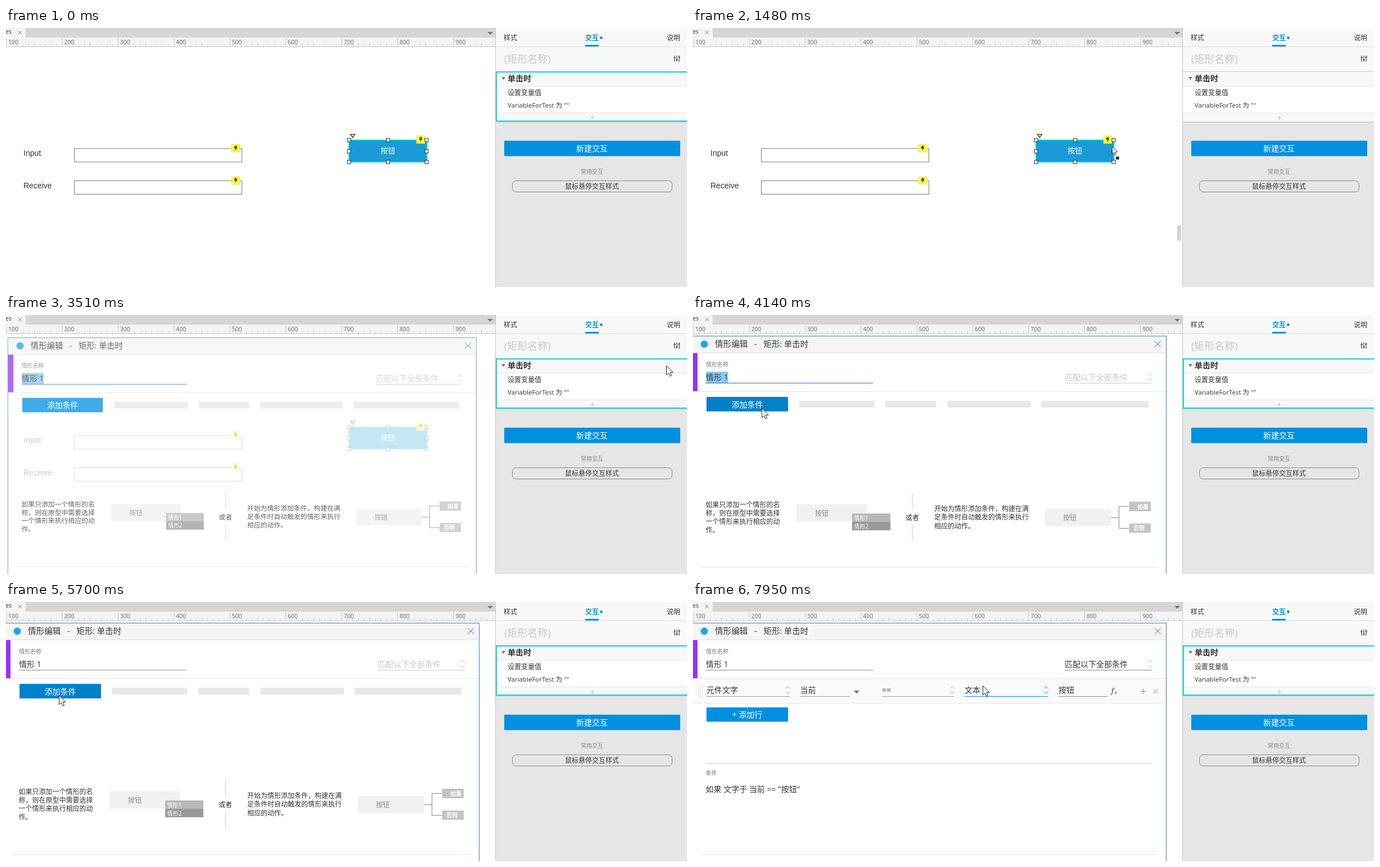
Recreate the animation shown at these times as an HTML page. Size 1211 by 462 pixels, loop 8000 ms.

```html
<!DOCTYPE html>
<html lang="zh">
<head>
<meta charset="utf-8">
<style>
html, body { margin: 0; width: 100%; height: 100%; overflow: hidden; background: #fff; }
svg { display: block; width: 1211px; height: 462px; }
text { font-family: "Open Sans", "Noto Sans CJK SC", "Noto Sans CJK", sans-serif; white-space: pre; }
.arial { font-family: "Liberation Sans", Arial, sans-serif; }
.serif { font-family: "Noto Serif", serif; font-style: italic; }
</style>
</head>
<body>
<svg id="stage" viewBox="0 0 1211 462"></svg>
<script>
const LOOP = 8000, BLUE = '#0090e0', HOVER = '#0081ca', DARK = '#333', CYAN = '#14d5da';

// Drawing helpers
const box = (x, y, w, h, fill, more = '') => `<rect x="${x}" y="${y}" width="${w}" height="${h}" fill="${fill}" ${more}/>`;
const path = (d, stroke, more = '') => `<path d="${d}" fill="none" stroke="${stroke}" ${more}/>`;
const shape = (d, fill, more = '') => `<path d="${d}" fill="${fill}" ${more}/>`;
const text = (x, y, s, size = 14, fill = DARK, more = '') =>
  `<text x="${x}" y="${y}" font-size="${size}" fill="${fill}" ${more}>${s}</text>`;
const mid = (x, y, s, size, fill, more = '') => text(x, y, s, size, fill, 'text-anchor="middle" ' + more);
const group = (id, body, more = '') => `<g id="${id}" ${more}>${body}</g>`;
const cross = (x, y, r, color) => path(`M${x - r} ${y - r}l${2 * r} ${2 * r}m0 ${-2 * r}l${-2 * r} ${2 * r}`, color);
const plus = (x, y, r, color) => path(`M${x - r} ${y}h${2 * r}m${-r} ${-r}v${2 * r}`, color);
const arrows = (x, y, color) => path(`M${x - 4} ${y - 2.5}l4 -4 4 4m0 5l-4 4 -4 -4`, color);
const lines = (x, y, step, rows) => rows.map((s, i) => text(x, y + i * step, s, 12)).join('');
const bolt = (x, y) => box(x, y, 15, 14, '#ffff3c', 'stroke="#d8d86a" stroke-width=".6"') +
  shape(`M${x + 6} ${y + 2.5}h4l-1.5 3h2.5l-5 6 1.2 -4.2h-3z`, '#444');

function ruler() {
  let out = box(0, 0, 870, 17.5, '#d6d6d6') + box(0, 0, 35, 18, '#f4f4f4') + box(0, 17.5, 870, 16, '#f4f4f4') +
    text(-1, 10, 'es', 10.5) + cross(24.5, 8, 3, '#777') + shape('M856 7h10l-5 5z', '#777');
  let ticks = '';
  for (let i = 0; i < 88; i++) {
    const x = (0.6 + i * 9.94).toFixed(1);
    ticks += i % 10 ? `M${x} ${i % 5 ? 29.5 : 27.5}V33` : `M${x} 18V33`;
  }
  out += path(ticks, '#c4c4c4');
  for (let i = 1; i < 10; i++) out += text(4 + (i - 1) * 99.4, 29, i * 100, 10.5, '#666');
  return out + path('M0 33.5H870', '#ccc');
}

function canvas() {
  const field = (y, label) => text(31, y + 12.5, label, 14, DARK, 'class="arial"') +
    box(121.5, y - 0.5, 298, 24, '#fff', 'stroke="#797979"') + bolt(401, y - 8);
  const grips = [[610, 200], [679.5, 200], [748, 200], [610, 220], [748, 220], [610, 239], [679.5, 239], [748, 239]];
  return field(215.5, 'Input') + field(273, 'Receive') +
    box(610, 200, 138.5, 39, '#1a9bd7', `stroke="${CYAN}" stroke-width="2"`) +
    mid(679, 222.5, '按钮', 13, '#fff') + bolt(730, 192) +
    grips.map(([x, y]) => box(x - 3, y - 3, 6, 6, '#fff', 'stroke="#222"')).join('') +
    shape('M612.5 189.5h8l-4 6z', '#ffe94a', 'stroke="#222" stroke-width="1.2"') +
    box(861, 351.5, 7, 28, '#d2d2d2', 'id="thumb" rx="1.5"');
}

function panel() {
  const sliders = [[1189, 53], [1193, 57], [1197, 52]]
    .map(([x, y]) => path(`M${x} 49V60M${x - 1.8} ${y}h3.6`, '#555', 'stroke-width="1.3"')).join('');
  return box(870, 0, 341, 462, '#e6e6e6') + box(870, 0, 341, 78, '#f8f8f8') + path('M870 33.5H1211', '#ddd') +
    text(885, 21.5, '样式', 12) + text(1030, 21.5, '交互', 12, BLUE, 'font-weight="700"') +
    text(1175, 21.5, '说明', 12) + `<circle cx="1058.5" cy="17.5" r="2.4" fill="${BLUE}"/>` +
    box(1030, 30, 24, 3, BLUE) + text(886, 62, '(矩形名称)', 18, '#c6c6c6') + sliders +
    box(871, 167, 340, 1.5, '#ccc') + box(871, 78, 340, 89, '#f8f8f8') + box(871, 104, 340, 47, '#fff') +
    path('M871 77.5H1211', '#ccc') + path('M871 103.5H1211M871 151.5H1211', '#e4e4e4') +
    shape('M881 87.5h7l-3.5 5z', '#777') + text(892, 94.5, '单击时', 14, DARK, 'font-weight="700"') +
    text(892, 120, '设置变量值', 12, DARK, 'font-weight="500"') +
    text(892, 142, 'VariableForTest 为 ""', 11.5) + plus(1042.5, 160, 3.5, '#bbb') +
    group('caseHover', box(871.5, 78.5, 345, 88, 'none', 'stroke="#888"') +
      box(1139.5, 82.5, 63, 15, '#e9e9e9', 'rx="5" stroke="#c4c4c4"') + mid(1171, 94, '启用情形', 10, '#888')) +
    box(872, 78.5, 345, 87.5, 'none', `id="caseSelected" stroke="${CYAN}" stroke-width="2"`) +
    box(886, 201, 313, 27.5, BLUE, 'rx="1.5"') + mid(1042, 220, '新建交互', 14, '#fff') +
    mid(1042, 260, '常用交互', 10, '#888') + box(900.5, 272.5, 284, 20, 'none', 'rx="7" stroke="#888"') +
    mid(1042, 287, '鼠标悬停交互样式', 12) + path('M870.5 0V462', '#c4c4c4');
}

function emptyPage() {
  const bars = [[189, 133.5], [342, 90.5], [452.5, 148], [620, 190.5]];
  return box(24, 146, 145, 26, BLUE, 'id="addButton" rx="1.5"') + mid(96.5, 164.5, '添加条件', 14, '#fff') +
    bars.map(([x, w]) => box(x, 153, w, 12, '#e8e8e8')).join('') +
    lines(22.5, 342.5, 15, ['如果只添加一个情形的名', '称，则在原型中需要选择', '一个情形来执行相应的动', '作。']) +
    box(184, 337.5, 125.5, 31, '#f1f1f1') + mid(229, 357.5, '按钮', 12, '#888') +
    box(283, 354, 68, 15, '#b8b8b8') + box(283, 369, 68, 15, '#9a9a9a') +
    text(286.5, 366, '情形1', 10, '#fff') + text(286.5, 380.5, '情形2', 10, '#fff') +
    path('M390 318V347M390 374V403', '#ccc') + mid(390, 365.5, '或者', 12, DARK) +
    lines(429, 349.5, 15.5, ['开始为情形添加条件，构建在满', '足条件时自动触发的情形来执行', '相应的动作。']) +
    box(625.5, 346, 117.5, 30.5, '#f1f1f1') + mid(670, 366, '按钮', 12, '#888') +
    path('M743 361.5H757.5M775 341.5H757.5V380.5H775', '#888') +
    box(775.5, 333, 38.5, 17, '#c4c4c4') + box(775.5, 372, 38.5, 16.5, '#c4c4c4') +
    mid(800, 345.5, '如果', 10, '#fff', 'font-weight="700"') + mid(793, 384, '否则', 10, '#fff', 'font-weight="700"');
}

const selects = [[24, 172, '元件文字'], [190.5, 279, '当前'], [336, 464.5, '=='], [483, 631.5, '文本']];

function rulePage() {
  let dots = '';
  for (let y = 149; y < 171; y += 3) for (let x = 10; x < 18; x += 3) dots += `M${x} ${y}h1`;
  const row = selects.map(([a, b, s], i) => text(a, 162, s) + group('select' + i,
    path(`M${a} 168.5H${b}`, 'inherit') + (i === 1 ? '' : arrows(b - 3.5, 157, 'inherit')))).join('');
  return box(4, 137, 837, 43, '#fafafa') + path('M0 180.5H841', '#e6e6e6') + path(dots, '#bbb') +
    row.replace(/stroke="inherit"/g, '') + shape('M286 158h10l-5 5.5z', '#777') +
    text(650, 162, '按钮') + path('M650 168.5H737', '#888') +
    text(744, 163, 'f', 13, '#444', 'class="serif"') + text(749.5, 164, 'x', 8, '#444', 'class="serif"') +
    plus(800.5, 159.5, 5, '#888') + cross(822.5, 159.5, 3.8, '#888') +
    box(24, 188, 145, 25.5, BLUE, 'rx="1.5"') + mid(96.5, 206, '+ 添加行', 14, '#fff') +
    path('M23 287.5H816', '#ccc') + text(22.5, 309, '条件', 10, '#777') +
    text(22.5, 339, '如果 文字于 当前 == "按钮"');
}

function dialog() {
  return box(-2, 37.5, 843.5, 500, '#fff', 'stroke="#2f82bd"') + box(-1, 38, 842, 29, '#f5f5f5') +
    path('M-1 67.5H841', '#ddd') + '<circle cx="20" cy="52" r="6.5" fill="#1fa5e2"/>' +
    text(39, 57, '情形编辑', 14.6) + text(109, 57, '-', 14.6) + text(125.5, 57, '矩形: 单击时', 14.4) +
    cross(826.5, 52, 5.5, '#555') + box(-1.5, 68, 9.5, 68, '#9a32fa') + text(23, 91.5, '情形名称', 10, '#777') +
    box(23, 101, 39.5, 20, '#8fcaf4', 'id="selection"') + text(23, 116, '情形 1') +
    path('M23 121.5H320', '#888', 'id="nameLine"') + text(661, 116, '匹配以下全部条件', 14, '', 'id="match"') +
    path('M661 121.5H816', '#ccc', 'id="matchLine"') + arrows(812, 110.5, '#bbb') + path('M8 136.5H841', '#e2e2e2') +
    group('emptyPage', emptyPage()) + group('rulePage', rulePage()) + path('M13 450.5H827', '#e0e0e0');
}

const pointer = group('pointer',
  shape('M0 0V16.5L3.8 13 6.4 18.8 9 17.6 6.5 12H11.6z', '#fff', 'id="arrow" stroke="#222" stroke-linejoin="round"') +
  box(7, 18, 5, 5, '#000', 'id="moveMark"'));

document.getElementById('stage').innerHTML =
  ruler() + canvas() + group('dialog', dialog()) + panel() + pointer;

// Pointer moves: first step, last step, number of steps, destination
const moves = [
  [440, 1190, 10, 660, 212], [1480, 1480, 1, 745, 211], [1557, 2020, 7, 1173, 90], [2320, 2320, 1, 1171, 90],
  [2550, 2550, 1, 1167, 89], [2630, 2790, 3, 1174, 88], [3020, 3105, 2, 1163, 78], [3190, 3190, 1, 1174, 89],
  [3430, 3430, 1, 1174, 90], [3586, 4140, 8, 122, 166], [4210, 4210, 1, 117, 152], [4290, 4610, 5, 100, 102],
  [4760, 4850, 2, 92, 173], [5310, 5310, 1, 93, 173], [5540, 5700, 3, 94, 166], [7090, 7880, 11, 511, 148],
  [7950, 7950, 1, 515, 149]
];

function pointerAt(t) {
  let x = 790, y = 470;
  for (const [start, end, steps, toX, toY] of moves) {
    if (t < start) break;
    const gap = (end - start) / (steps - 1 || 1) || 1;
    const p = Math.min(steps, Math.floor((t - start) / gap + 0.001) + 1) / steps;
    const ease = start === 440 ? Math.sin(p * Math.PI / 2) : p * p * (3 - 2 * p);
    x += (toX - x) * ease;
    y += (toY - y) * ease;
  }
  return [x, y];
}

const $ = id => document.getElementById(id);
const show = (id, on) => $(id).setAttribute('visibility', on ? 'inherit' : 'hidden');
const paint = (id, name, value) => $(id).setAttribute(name, value);

function render(t) {
  const [x, y] = pointerAt(t);
  const inside = (a, b, c, d) => x >= a && x <= c && y >= b && y <= d;
  const open = t >= 3430, rules = t >= 6470, naming = t < 5160;
  const selected = t < 1190 || open;
  const overButton = !open && inside(610, 200, 750, 240);

  show('pointer', t >= 440);
  paint('pointer', 'transform', `translate(${Math.round(x) + 0.5} ${Math.round(y) + 0.5})`);
  paint('arrow', 'transform', overButton ? 'scale(.8)' : '');
  show('moveMark', t >= 440 && overButton);
  show('thumb', t >= 440 && !open && x < 870);
  show('caseSelected', selected);
  show('caseHover', !selected && inside(871, 77, 1211, 167));

  const shown = [0.35, 0.75, 0.95, 1][Math.max(0, Math.min(3, Math.floor((t - 3430) / 78)))];
  const scale = 1 - 0.05 * (1 - shown);
  show('dialog', open);
  paint('dialog', 'opacity', shown);
  paint('dialog', 'transform', `translate(420 287) scale(${scale}) translate(-420 -287)`);

  show('selection', naming);
  paint('nameLine', 'stroke', naming ? '#1a78c0' : '#888');
  paint('match', 'fill', rules ? DARK : '#c8c8c8');
  paint('matchLine', 'stroke', rules ? '#888' : '#ccc');
  show('emptyPage', !rules);
  show('rulePage', rules);
  paint('addButton', 'fill', inside(24, 146, 169, 172) ? HOVER : BLUE);
  selects.forEach(([a, b], i) => paint('select' + i, 'stroke', inside(a, 148.5, b, 169) ? BLUE : '#999'));
}

function tick() {
  render(performance.now() % LOOP);
  requestAnimationFrame(tick);
}
tick();
</script>
</body>
</html>
```
